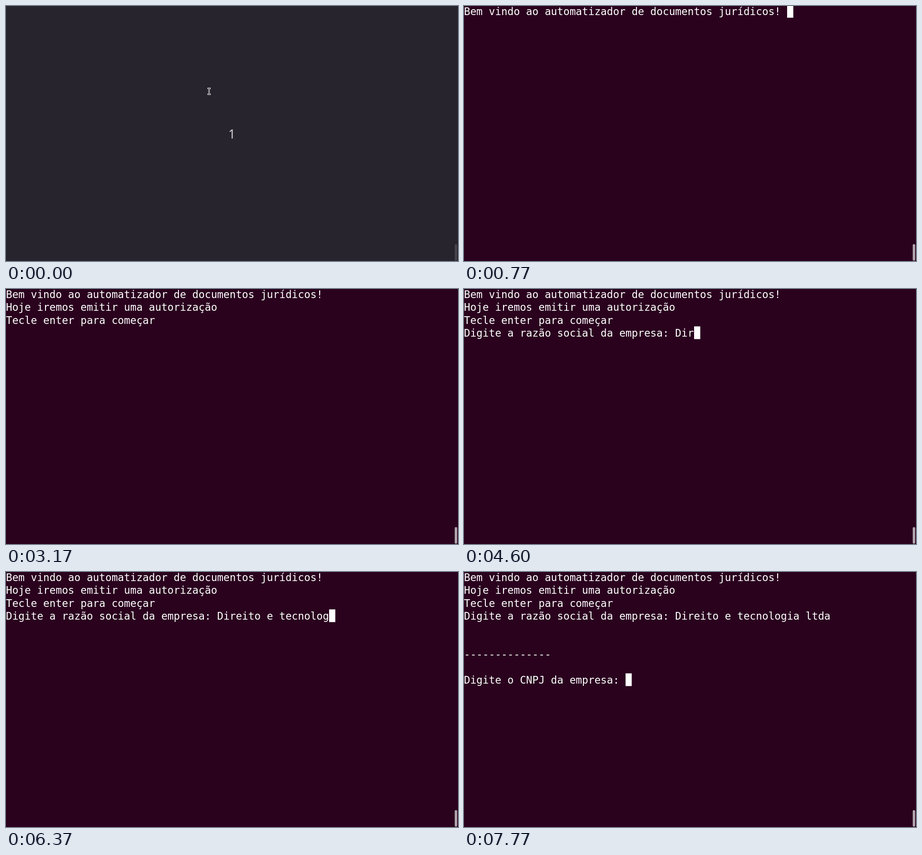
Write an HTML page that moves like this. It is 996 by 562 pixels and loops after 8 s.

```html
<!DOCTYPE html>
<html lang="pt">
<head>
<meta charset="utf-8">
<style>
  html, body { margin: 0; width: 100%; height: 100%; overflow: hidden; background: #2a021e; }
  svg { display: block; }
  .term { font: 22.74px "DejaVu Sans Mono", monospace; fill: #fff; white-space: pre; }
  .count { font: 27px "Noto Sans", sans-serif; fill: #d3d0d1; text-anchor: middle; }
</style>
</head>
<body>
<svg width="996" height="562" viewBox="0 0 996 562">
  <defs><path id="beam" d="M445.5 181.5h4M445.5 194.5h4M447.5 181.5v13"/></defs>
  <rect id="back" width="996" height="562"/>
  <g id="intro">
    <text class="count" x="497.8" y="291.5">1</text>
    <g stroke-linecap="square">
      <use href="#beam" stroke="#fff" stroke-width="2.8"/>
      <use href="#beam" stroke="#15131a"/>
    </g>
  </g>
  <g id="term" class="term"></g>
  <rect id="caret" width="13.6" height="28" fill="#fff"/>
  <rect id="bar" x="988.8" y="524.7" width="5.4" height="36.6" rx="2.7"/>
</svg>
<script>
const LOOP = 8000, INTRO = 100, COL = 13.69, ROW = 28.2, TOP = -2.2;
const BLINK = 570, WAKE = 30;
const $ = id => document.getElementById(id);

const row = (at, text) => ({ at, text });
const screen = [
  row(770, "Bem vindo ao automatizador de documentos jurídicos! "),
  row(1800, "Hoje iremos emitir uma autorização "),
  row(2600, "Tecle enter para começar "),
  row(3330, "Digite a razão social da empresa: "),
  row(7670, ""),
  row(7700, ""),
  row(7700, "-".repeat(14)),
  row(7700, ""),
  row(7770, "Digite o CNPJ da empresa: ")
];
const INPUT = 3;
const company = "Direito e tecnologia ltda";

// Typing rhythm: steady pace between these moments
const pace = [
  { at: 3730, n: 1 }, { at: 4500, n: 2 }, { at: 4800, n: 6 },
  { at: 5200, n: 10 }, { at: 5470, n: 12 }, { at: 6370, n: 18 },
  { at: 6430, n: 20 }, { at: 7070, n: 24 }, { at: 7530, n: 25 }
];

// Piecewise linear lookup in either direction
function along(x, from, to) {
  const i = pace.findIndex(p => p[from] > x);
  if (i < 0) return pace[pace.length - 1][to];
  if (i === 0) return 0;
  const a = pace[i - 1], b = pace[i];
  return a[to] + (b[to] - a[to]) * (x - a[from]) / (b[from] - a[from]);
}

const labels = screen.map((_, i) => {
  const el = document.createElementNS("http://www.w3.org/2000/svg", "text");
  el.setAttribute("y", TOP + ROW * i + 22.4);
  return $("term").appendChild(el);
});

function draw(t) {
  const intro = t < INTRO;
  $("back").setAttribute("fill", intro ? "#27242e" : "#2a021e");
  $("bar").setAttribute("fill", intro ? "#47444c" : "#b2a7ae");
  $("intro").style.display = intro ? "" : "none";

  const typed = Math.floor(along(t, "at", "n") + 1e-6);
  const shown = screen.filter(r => r.at <= t);
  const lines = shown.map((r, i) => i === INPUT ? r.text + company.slice(0, typed) : r.text);
  labels.forEach((el, i) => {
    const s = lines[i] || "";
    if (el.textContent !== s) el.textContent = s;
  });

  // The caret stays lit after each change and wakes just before the next output
  const end = shown.length - 1;
  const next = screen[shown.length];
  const changed = end < 0 ? 0 : Math.max(shown[end].at, along(typed, "n", "at"));
  const lit = end >= 0 && (t - changed < BLINK || (next && t >= next.at - WAKE));
  $("caret").style.display = lit ? "" : "none";
  if (lit) {
    $("caret").setAttribute("x", Math.round(lines[end].length * COL));
    $("caret").setAttribute("y", TOP + ROW * end);
  }
}

const began = performance.now();
function tick() {
  draw((performance.now() - began) % LOOP);
  requestAnimationFrame(tick);
}
draw(0);
requestAnimationFrame(tick);
</script>
</body>
</html>
```
